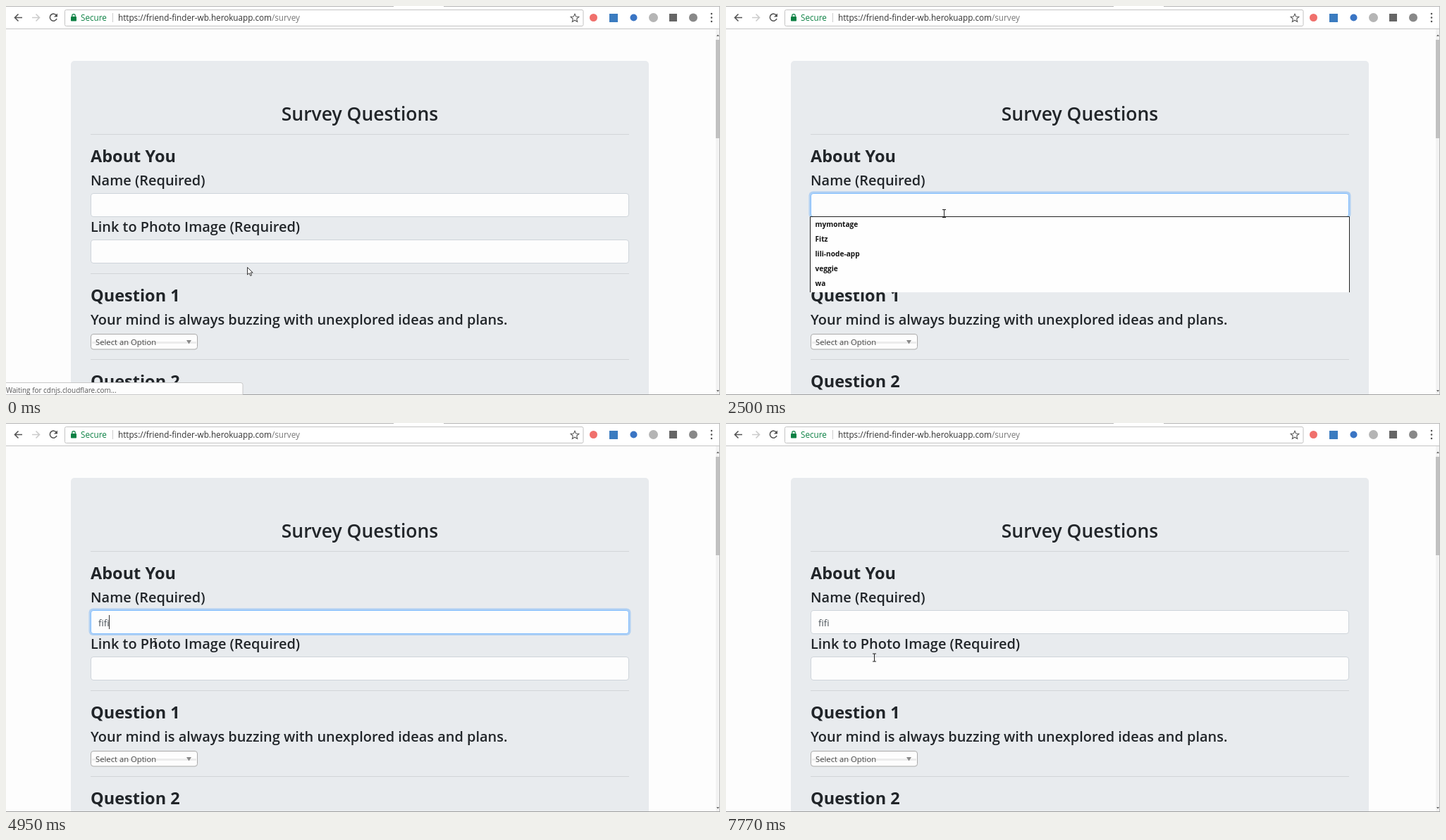
Write an HTML page that moves like this. It is 1013 by 553 pixels and loops after 8 s.

```html
<!DOCTYPE html>
<html lang="en">
<head>
<meta charset="utf-8">
<title>Survey</title>
<style>
  html, body { margin: 0; width: 100%; height: 100%; overflow: hidden; background: #fdfdfd; }
  svg { display: block; width: 1013px; height: 553px; font-family: "Open Sans", "Noto Sans", sans-serif; }
  text { fill: #212529; white-space: pre; }
  .h2 { font-size: 26.5px; font-weight: 600; text-anchor: middle; }
  .h3 { font-size: 23.5px; font-weight: 700; }
  .h4 { font-size: 19.95px; font-weight: 600; }
  .url { font-size: 11.7px; }
  .list { font-size: 10.15px; font-weight: 700; }
  .list text { fill: #111; }
  .hr { stroke: #d2d5d8; }
  .field { fill: #fdfdfd; stroke: #ced4da; }
  .line { fill: none; stroke: #555; stroke-width: 1.6; }
</style>
</head>
<body>
<svg viewBox="0 0 1013 553">
  <!-- browser bar -->
  <rect width="1013" height="32" fill="#fff"/>
  <path d="M0 .5H550M621 .5H1013" stroke="#b5b5b5"/>
  <path d="M0 32.5H1013" stroke="#c4c4c4"/>
  <path class="line" d="M23 16.5H13M17.5 11.5L12.5 16.5L17.5 21.5"/>
  <path class="line" style="stroke:#ccc" d="M37 16.5H47M42.5 11.5L47.5 16.5L42.5 21.5"/>
  <path class="line" d="M71.5 13.4A5 5 0 1 0 72 18"/>
  <path d="M73 10.5V15.6H67.9z" fill="#555"/>
  <rect x="83.5" y="5.5" width="735.5" height="23" rx="2" fill="#fff" stroke="#c3c3c3"/>
  <rect x="92" y="15" width="8" height="6.5" rx=".8" fill="#0b8043"/>
  <path d="M93.8 15.5V13.8a2.2 2.2 0 0 1 4.4 0V15.5" fill="none" stroke="#0b8043" stroke-width="1.2"/>
  <text class="url" x="106" y="21" style="fill:#0b8043">Secure</text>
  <path d="M151.5 10V23" stroke="#ccc"/>
  <text class="url" x="159" y="21" style="fill:#333">https://friend-finder-wb.herokuapp.com<tspan fill="#777">/survey</tspan></text>
  <path d="M807 11.3l1.7 3.8 4.1.4-3.1 2.8.9 4.1-3.6-2.2-3.6 2.2.9-4.1-3.1-2.8 4.1-.4z" fill="none" stroke="#555" stroke-width="1.1"/>
  <circle cx="833.5" cy="16.5" r="5.5" fill="#f0706c"/>
  <rect x="856" y="11" width="12" height="12" fill="#3b7cc0"/>
  <circle cx="890.5" cy="16.5" r="5" fill="#3a75c4"/>
  <circle cx="918.5" cy="16.5" r="6.5" fill="#b5b5b5"/>
  <rect x="941" y="11" width="11" height="11" fill="#666"/>
  <circle cx="975" cy="16.5" r="6" fill="#888"/>
  <path d="M1001 11h.01M1001 16.5h.01M1001 22h.01" stroke="#555" stroke-width="2.6" stroke-linecap="round"/>

  <!-- survey -->
  <path d="M92 553V83a5 5 0 0 1 5-5H907a5 5 0 0 1 5 5V553z" fill="#e8ebee"/>
  <text class="h2" x="502" y="162.5">Survey Questions</text>
  <path class="hr" d="M120 182.5H884M120 380.5H884M120 502.5H884"/>
  <text class="h3" x="120" y="222">About You</text>
  <text class="h4" x="120" y="255">Name (Required)</text>
  <rect id="ring" x="117.5" y="263.5" width="769" height="38.5" rx="6" fill="#b0d0f3"/>
  <rect id="name" class="field" x="120.5" y="266.5" width="763" height="33" rx="3.5"/>
  <text id="typed" x="131" y="289" font-size="13.25" style="fill:#495057"></text>
  <path id="caret" d="M.5 273V293" stroke="#333"/>
  <text class="h4" x="120" y="321">Link to Photo Image (Required)</text>
  <rect class="field" x="120.5" y="332.5" width="763" height="33" rx="3.5"/>
  <text class="h3" x="120" y="420">Question 1</text>
  <text class="h4" x="120" y="453">Your mind is always buzzing with unexplored ideas and plans.</text>
  <rect x="120.5" y="466.5" width="151" height="21.5" rx="3.5" fill="#fdfdfd" stroke="#aaa"/>
  <rect x="122" y="477" width="148" height="3" fill="#ececec"/>
  <text x="127" y="482" font-size="11.25" style="fill:#444">Select an Option</text>
  <path d="M256 475H263L259.5 480.5z" fill="#888"/>
  <text class="h3" x="120" y="542">Question 2</text>

  <!-- suggestions -->
  <g id="list" class="list">
    <rect x="119" y="299" width="766" height="108" fill="#fefefe"/>
    <path d="M119.5 407V299.5H884.5V407" fill="none" stroke="#222"/>
  </g>

  <!-- scroll bar, frame, status -->
  <rect x="1007" y="33" width="6" height="520" fill="#f3f3f3"/>
  <rect x="1007" y="48" width="5.5" height="140" fill="#c1c1c1"/>
  <path d="M1008 43l2-2.5 2 2.5zM1008 546l2 2.5 2-2.5z" fill="#666"/>
  <path d="M1012.5 0V553" stroke="#bbb"/>
  <path d="M0 552.5H1013" stroke="#a0a0a0"/>
  <g id="status">
    <path d="M-1 535.5H333a3 3 0 0 1 3 3V552.5H-1z" fill="#fdfdfd" stroke="#c8c8c8"/>
    <text x="0" y="549.5" font-size="9.93" style="fill:#555">Waiting for cdnjs.cloudflare.com...</text>
  </g>

  <path id="arrow" d="M.5.5V11L3 8.7L4.8 12.5L6.5 11.8L4.9 8.1H8.2z" fill="#fff" stroke="#222" stroke-width=".9"/>
  <path id="beam" d="M-2.5-5.5H2.5M-2.5 5.5H2.5M0-5.5V5.5" stroke="#222" fill="none"/>
</svg>
<script>
const LOOP = 8000;
const $ = id => document.getElementById(id);
const show = (id, on) => $(id).setAttribute("visibility", on ? "visible" : "hidden");

["mymontage", "Fitz", "lili-node-app", "veggie", "wa"].forEach((word, i) => {
  const item = document.createElementNS("http://www.w3.org/2000/svg", "text");
  item.setAttribute("x", 126.5);
  item.setAttribute("y", 313.6 + 21.2 * i);
  item.textContent = word;
  $("list").append(item);
});

// pointer stops of the screen recording: time, x, y, shape
const A = "arrow", I = "beam";
const pointer = [
  [0, 342, 371, A], [120, 359, 371, A], [270, 386, 345, A], [390, 360, 308, A],
  [540, 343.5, 301.5, I], [690, 322.5, 297.5, I], [810, 309.5, 295, I],
  [4550, 238.5, 334, I], [4800, 238.5, 335, I], [4950, 211.5, 312, I],
  [5070, 222.5, 285, I], [5190, 238.5, 255, I], [5310, 258, 228, A],
  [5430, 283, 197, A], [5580, 300, 185, A], [5700, 312, 177, A],
  [6350, 311, 183, A], [6500, 240.5, 300, I], [6620, 212.5, 342, I],
  [6870, 235.5, 318, I], [6990, 270, 255, A], [7110, 295, 193, A],
  [7530, 262, 250, A], [7650, 230.5, 310, I], [7770, 210.5, 333.5, I]
];
const keys = [2780, 3060, 3340, 3460];
const blinks = [960, 1510, 2100, 2500, 2780, 3990, 4550, 5070, 5580, 6100, 6620, 7110];

const passed = (times, t) => times.filter(k => k <= t).length;

function draw(t) {
  const [, x, y, shape] = pointer[passed(pointer.map(p => p[0]), t) - 1];
  for (const id of [A, I]) show(id, id === shape);
  $(shape).setAttribute("transform", `translate(${x} ${y})`);

  $("status").setAttribute("opacity", t < 120 ? 1 : t < 270 ? 0.66 : t < 390 ? 0.3 : 0);
  show("list", t >= 960 && t < 2780);

  const focused = t >= 1110 && t < 7260;
  show("ring", focused);
  $("name").style.stroke = focused ? "#80bdff" : "";

  const typed = $("typed");
  typed.textContent = "fifi".slice(0, passed(keys, t));
  const end = typed.textContent ? typed.getComputedTextLength() : 0;
  $("caret").setAttribute("transform", `translate(${Math.floor(131 + end)})`);
  show("caret", passed(blinks, t) % 2);
}

function tick() {
  draw(performance.now() % LOOP);
  requestAnimationFrame(tick);
}
tick();
</script>
</body>
</html>
```
